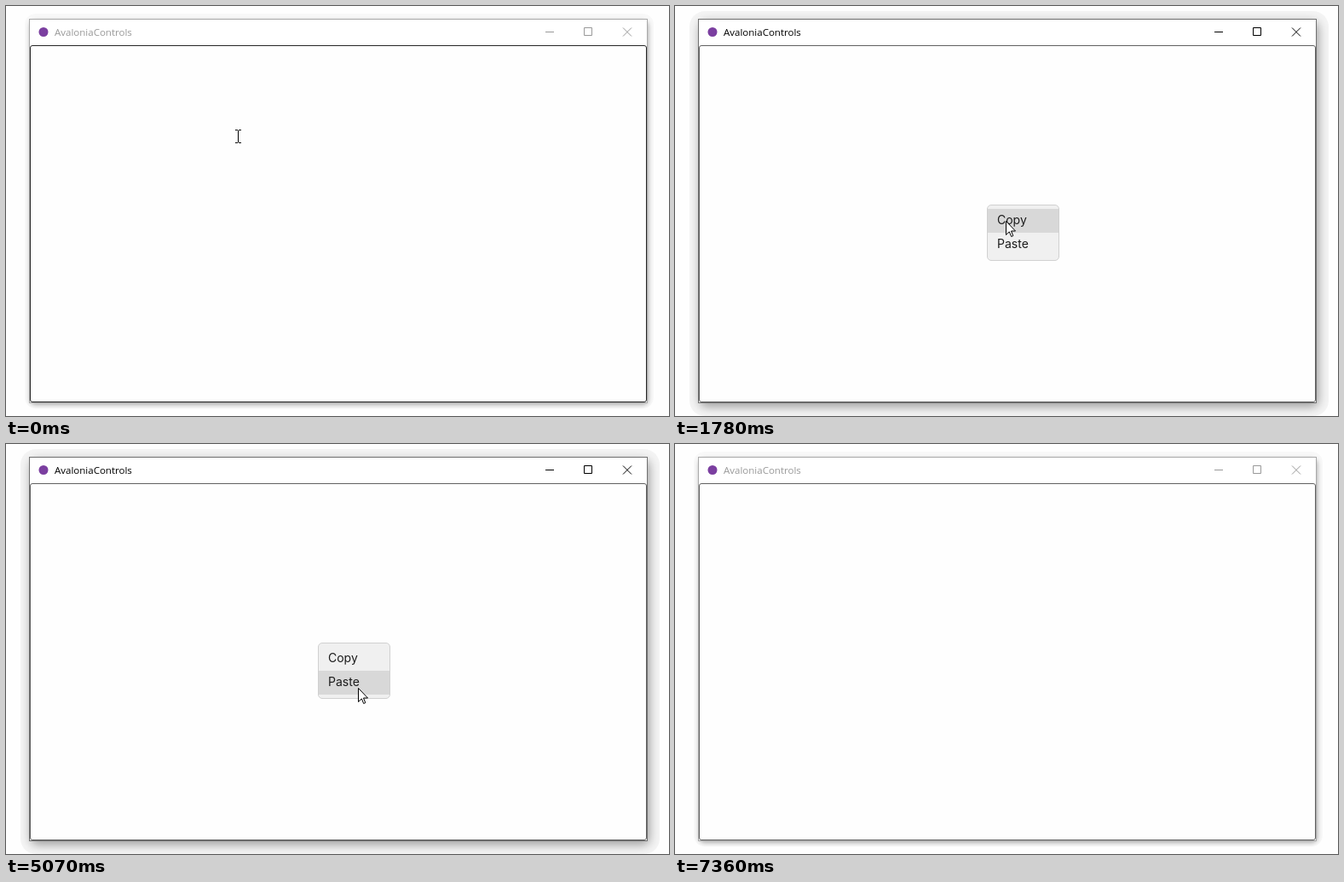
Write an HTML page that moves like this. It is 778 px wide and 481 px high and loops after 7.38 s.

```html
<!DOCTYPE html>
<html lang="en">
<head>
<meta charset="utf-8">
<title>Context menu</title>
<style>
  html, body { margin: 0; width: 100%; height: 100%; overflow: hidden; background: #fefefe; }
  svg { position: absolute; left: 0; top: 0; width: 778px; height: 481px; overflow: hidden; }

  @property --x { syntax: '<integer>'; inherits: false; initial-value: 0; }
  @property --y { syntax: '<integer>'; inherits: false; initial-value: 0; }

  .shadow, .chrome, .frame, .box, .focus, .caret, .menu, .copy, .paste, .beam, .arrow {
    animation: 7.38s step-end infinite;
  }

  /* Window: inactive, then active */
  .shadow {
    position: absolute; left: 27px; top: 15px; width: 726px; height: 451px;
    border-radius: 7px; animation-name: shadow;
  }
  @keyframes shadow {
    0%, 98.915%, 100% { box-shadow: 1px 2px 5px rgba(0,0,0,.3), 1px 0 0 6px #f8f8f8; }
    7.046% { box-shadow: 2px 4px 12px rgba(0,0,0,.36), 2px 3px 0 12px #f4f4f4; }
  }
  .chrome { animation-name: chrome; }
  @keyframes chrome {
    0%, 98.915%, 100% { color: #999; }
    7.046% { color: #000; }
  }
  .frame { animation-name: frame; }
  @keyframes frame {
    0%, 98.915%, 100% { stroke: #aaa; }
    7.046% { stroke: #707070; }
  }

  /* Text box */
  .box { animation-name: box; }
  @keyframes box {
    0%, 100% { stroke: #262626; }
    7.046% { stroke: #606060; }
  }
  .focus { animation-name: focus; }
  @keyframes focus {
    0%, 8.672%, 98.915%, 100% { opacity: 0; }
    7.046%, 79.268% { opacity: 1; }
  }
  .caret { animation-name: caret; }
  @keyframes caret {
    0%, 8.672%, 85.907%, 98.915%, 100% { opacity: 0; }
    7.046%, 79.268%, 93.089% { opacity: 1; }
  }

  /* Menu and its hover rows */
  .menu { animation-name: menu; }
  @keyframes menu {
    0%, 79.268%, 100% { opacity: 0; }
    8.672% { opacity: 1; }
  }
  .copy { animation-name: copy; }
  @keyframes copy {
    0%, 46.26%, 100% { opacity: 0; }
    19.47% { opacity: 1; }
  }
  .paste { animation-name: paste; }
  @keyframes paste {
    0%, 71.79%, 100% { opacity: 0; }
    46.26% { opacity: 1; }
  }

  /* Pointer */
  .beam { animation-name: beam; }
  @keyframes beam {
    0%, 79.268% { opacity: 1; }
    8.672%, 89.74%, 100% { opacity: 0; }
  }
  .arrow { animation-name: arrow; }
  @keyframes arrow {
    0%, 79.268% { opacity: 0; }
    8.672%, 89.74%, 100% { opacity: 1; }
  }
  .pointer {
    transform: translate(calc(var(--x) * 1px), calc(var(--y) * 1px));
    animation: travel 7.38s step-end infinite;
  }
  @keyframes travel {
    0%      { --x: 271; --y: 152; }
    .677%   { --x: 271; --y: 152; animation-timing-function: steps(6, jump-both); }
    7.046%  { --x: 367; --y: 233; }
    18.699% { --x: 367; --y: 233; animation-timing-function: steps(7, jump-both); }
    24.119% { --x: 388; --y: 252; }
    45.257% { --x: 391; --y: 262; animation-timing-function: steps(5); }
    50.27%  { --x: 403; --y: 282; }
    68.699% { --x: 413; --y: 286; animation-timing-function: steps(7); }
    74.119% { --x: 486; --y: 292; }
    85.907% { --x: 486; --y: 292; animation-timing-function: steps(6, jump-both); }
    90.514%, 100% { --x: 776; --y: 503; }
  }

  .title { font: 11.5px "Open Sans", "Noto Sans", sans-serif; fill: currentColor; }
  .item { font: 14px Inter, sans-serif; fill: #1c1c1c; }
</style>
</head>
<body>
<div class="shadow"></div>
<svg viewBox="0 0 778 481" fill="none">
  <rect class="frame" x="27.5" y="15.5" width="725" height="450" fill="#fff"/>
  <circle cx="44" cy="30.5" r="5.5" fill="#7b3fa0"/>
  <g class="chrome">
    <text class="title" x="57" y="35">AvaloniaControls</text>
    <path d="M633 30.5h10M678.5 25.5h9v9h-9zM724 25.5l10 10M734 25.5l-10 10" stroke="currentColor"/>
  </g>

  <rect class="box" x="28.5" y="46.5" width="723" height="418" rx="2.5" fill="#fefefe"/>
  <rect class="focus" x="29" y="47" width="722" height="417" rx="2.5" stroke="#0078d0" stroke-width="2"/>
  <path class="caret" d="M39.5 53v17" stroke="#000"/>

  <g class="menu">
    <rect x="366.5" y="233.5" width="84" height="65" rx="4.5" fill="#f0f0f0" stroke="#d0d0d0"/>
    <rect class="copy" x="367" y="238" width="83" height="28" fill="#d8d8d8"/>
    <rect class="paste" x="367" y="266" width="83" height="28" fill="#d8d8d8"/>
    <text class="item" x="378" y="256">Copy</text>
    <text class="item" x="378" y="284">Paste</text>
  </g>

  <g class="pointer">
    <path class="beam" d="M-2 -6.5h3M2 -6.5h3M1.5 -6v14M-2 8.5h3M2 8.5h3" stroke="#000"/>
    <path class="arrow" d="M.5 .5V16.5L4.3 12.9L6.7 18.5L8.8 17.6L6.5 12H11.5Z" fill="#fff" stroke="#000"/>
  </g>
</svg>
</body>
</html>
```
